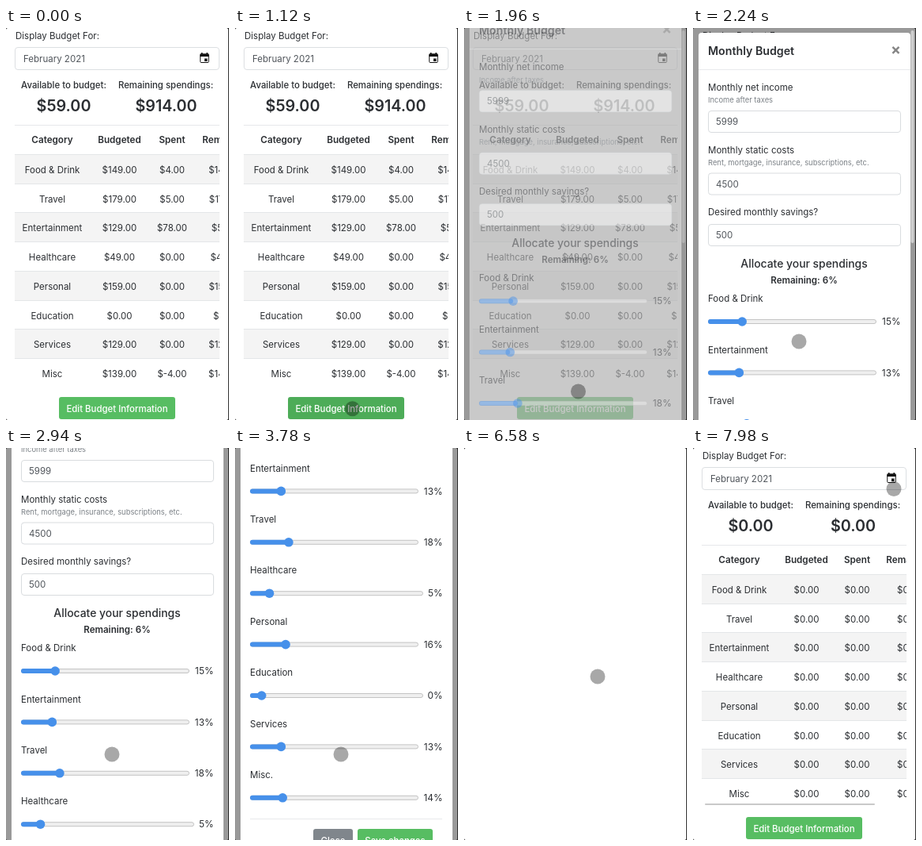
Animation of 282x494 px, one loop 8000 ms. Source, as an HTML page with a canvas:

```html
<!DOCTYPE html>
<html lang="en">
<head>
<meta charset="utf-8">
<title>Monthly budget</title>
<style>
html, body { margin: 0; width: 100%; height: 100%; overflow: hidden; background: #333; }
canvas { display: block; width: 282px; height: 494px; }
</style>
</head>
<body>
<canvas id="stage"></canvas>
<script>
const W = 282, H = 494, LOOP = 8000, STEP = 70;
const canvas = document.getElementById('stage');
const c = canvas.getContext('2d');
const dpr = window.devicePixelRatio || 1;
canvas.width = W * dpr;
canvas.height = H * dpr;

const INK = '#2b2e32', GREEN = '#57bd62', GREEN_HOVER = '#4dac58', BLUE = '#4690ea';
const BACKDROP = 0.4, CONTENT_H = 919;

// Budget rows: name, budgeted, spent
const rows = [
  ['Food & Drink', 149, 4], ['Travel', 179, 5], ['Entertainment', 129, 78],
  ['Healthcare', 49, 0], ['Personal', 159, 0], ['Education', 0, 0],
  ['Services', 129, 0], ['Misc', 139, -4]
];
const sliders = [
  ['Food & Drink', 15], ['Entertainment', 13], ['Travel', 18], ['Healthcare', 5],
  ['Personal', 16], ['Education', 0], ['Services', 13], ['Misc.', 14]
];

// Keyframes: time followed by values
const scrollKeys = [[2310, 0], [2520, 50], [2800, 86], [2940, 89], [3150, 230],
  [3430, 230], [3640, 350], [3710, 350], [3780, 380], [3920, 425]];
const cursorKeys = [[350, 150, 506], [490, 150, 482], [700, 150, 482], [1260, 148, 479],
  [1890, 148, 479], [2170, 134, 395], [2380, 134, 395], [2800, 134, 386], [4060, 134, 386],
  [4900, 168, 458], [6370, 168, 458], [6580, 169, 288], [6860, 200, 130],
  [7210, 228.5, 46], [7350, 228.5, 46], [7420, 254, 51.5]];

const clamp01 = v => Math.min(1, Math.max(0, v));
const ramp = (t, start, length) => clamp01((t - start) / length);
const money = n => '$' + n.toFixed(2);

function at(keys, t) {
  const i = keys.findIndex(k => k[0] > t);
  if (i < 0) return keys[keys.length - 1].slice(1);
  if (i === 0) return keys[0].slice(1);
  const a = keys[i - 1], b = keys[i], p = (t - a[0]) / (b[0] - a[0]);
  return a.slice(1).map((v, j) => v + (b[j + 1] - v) * p);
}

// y is the middle of the capital letters
function text(str, x, y, { size = 11.5, weight = 400, color = INK, align = 'left' } = {}) {
  c.font = `${weight} ${size}px Inter, "Open Sans", sans-serif`;
  c.textAlign = align;
  c.fillStyle = color;
  c.fillText(str, x, y + size * 0.36);
}

function box(x, y, w, h, r, fill, stroke) {
  c.beginPath();
  c.roundRect(x, y, w, h, r);
  if (fill) { c.fillStyle = fill; c.fill(); }
  if (stroke) { c.strokeStyle = stroke; c.lineWidth = 1; c.stroke(); }
}

function rect(x, y, w, h, fill) {
  c.fillStyle = fill;
  c.fillRect(x, y, w, h);
}

function disc(x, y, r, fill) {
  c.beginPath();
  c.arc(x, y, r, 0, 7);
  c.fillStyle = fill;
  c.fill();
}

function button(label, x, y, w, fill) {
  box(x, y, w, 28, 3, fill);
  text(label, x + w / 2, y + 14.5, { size: 11.4, weight: 500, color: '#fff', align: 'center' });
}

function calendarIcon(x, y) {
  box(x + 0.75, y + 2, 10.5, 10.5, 1, null, '#111');
  rect(x + 0.5, y + 1.5, 11, 3.5, '#111');
  rect(x + 2, y, 1.5, 2, '#111');
  rect(x + 8.5, y, 1.5, 2, '#111');
  rect(x + 6, y + 7.5, 3.5, 3.5, '#111');
}

function page(empty, hover) {
  const mid = { align: 'center' }, head = { align: 'center', weight: 600, size: 11.7 };
  const big = { align: 'center', weight: 600, size: 19.8 };
  const label = { align: 'center', weight: 500, size: 11.4 };
  const spentX = empty ? 207.5 : 210, remX = empty ? 274 : 278;

  text('Display Budget For:', 12, 10);
  box(11.5, 24.5, 258, 28, 3.5, '#fff', '#dcdfe2');
  text('February 2021', 22, 39, { color: '#50555b' });
  calendarIcon(245, 31);
  text('Available to budget:', 73, 72, label);
  text('Remaining spendings:', 202, 72, label);
  text(money(empty ? 0 : 59), 73, 98, big);
  text(money(empty ? 0 : 914), 202.5, 98, big);

  c.save();
  c.beginPath();
  c.rect(11, 120, 259, 335);
  c.clip();
  rect(11, 122, 259, 1, '#e6e8ea');
  text('Category', 58.5, 141, head);
  text('Budgeted', 143.5, 141, head);
  text('Spent', spentX, 141, head);
  text('Remaining', remX, 141, head);
  rows.forEach(([name, budget, spent], i) => {
    const top = 159 + Math.round(36.7 * i), y = top + 20;
    if (i % 2 === 0) rect(11, top, 259, 37, '#f4f4f4');
    rect(11, top, 259, 1, '#e4e6e8');
    text(name, 58.5, y, mid);
    text(money(empty ? 0 : budget), 143.5, y, mid);
    text(money(empty ? 0 : spent), spentX, y, mid);
    text(money(empty ? 0 : budget - spent), remX, y, mid);
  });
  if (empty) box(15, 448, 215, 2, 1, '#c9c9c9');
  c.restore();
  button('Edit Budget Information', 67, 465, 147, hover ? GREEN_HOVER : GREEN);
}

function field(label, hint, value, y) {
  text(label, 19, y);
  if (hint) text(hint, 19, y + 16, { size: 9.4, color: '#7b8086' });
  const top = y + (hint ? 29 : 15);
  box(19.5, top + 0.5, 243, 27, 3.5, '#fff', '#d9dcdf');
  text(value, 29, top + 14, { color: '#50555b' });
}

function slider(label, percent, y) {
  const w = percent < 10 ? 219 : 213;
  const x = 25 + (w - 12) * (percent + 4.4) / 105;
  text(label, 19, y);
  box(19.5, y + 26.5, w - 1, 5, 2.5, '#efefef', '#c4c4c4');
  box(19, y + 26, x - 19, 6, 3, BLUE);
  disc(x, y + 29, 5.8, BLUE);
  text(percent + '%', 262.5, y + 29, { size: 11.8, align: 'right' });
}

function modal(scroll, slide, hover) {
  c.save();
  c.translate(0, slide - scroll);
  box(7, 6, 268, 906, 4, '#fff');
  text('Monthly Budget', 19, 29, { size: 14.2, weight: 600 });
  text('×', 256.5, 27.5, { size: 19, weight: 700, color: '#858585', align: 'center' });
  rect(7, 52, 268, 1, '#e8eaec');
  field('Monthly net income', 'Income after taxes', '5999', 75);
  field('Monthly static costs', 'Rent, mortgage, insurance, subscriptions, etc.', '4500', 153.5);
  field('Desired monthly savings?', '', '500', 232);
  text('Allocate your spendings', 140.5, 296.5, { size: 13.9, weight: 500, align: 'center' });
  text('Remaining: 6%', 140.5, 318, { size: 11.6, weight: 600, align: 'center' });
  sliders.forEach(([label, percent], i) => slider(label, percent, 341 + 64.4 * i));
  rect(19, 847, 243, 1, '#e8eaec');
  button('Close', 99, 860, 50, '#80868c');
  button('Save changes', 155, 860, 95, hover ? GREEN_HOVER : GREEN);
  c.restore();
}

function cursor(t) {
  if (t < 420) return;
  const [x, y] = at(cursorKeys, t);
  const pressed = (t >= 1540 && t < 1890) || (t >= 5810 && t < 6020);
  if (!pressed) return disc(x, y, 9.5, 'rgba(0,0,0,.34)');
  disc(x, y, 9.5, 'rgba(40,50,45,.5)');
  c.strokeStyle = 'rgba(225,225,225,.7)';
  c.lineWidth = 1.6;
  c.stroke();
}

function draw(t) {
  c.setTransform(dpr, 0, 0, dpr, 0, 0);
  rect(0, 0, W, H, '#333');
  c.save();
  c.beginPath();
  c.roundRect(0, 0, W - 1, H, 2.5);
  c.clip();
  rect(0, 0, W, H, '#fff');

  if (t < 6160) {
    page(false, t >= 490 && t < 1960);
    rect(0, 0, W, H, `rgba(0,0,0,${BACKDROP * ramp(t, 1680, 210)})`);
    const [scroll] = at(scrollKeys, t);
    c.globalAlpha = ramp(t, 1890, 150);
    if (c.globalAlpha > 0) {
      modal(scroll, -44 * (1 - ramp(t, 1890, 300)) ** 2, t >= 4830);
      if (t < 2800) box(275.5, 3 + scroll * H / CONTENT_H, 4, 268, 2, '#cfcfcf');
    }
    c.globalAlpha = 1;
  } else if (t >= 7700) {
    page(true, false);
  }
  cursor(t);
  c.restore();
}

const start = performance.now();
function tick() {
  const t = (performance.now() - start) % LOOP;
  draw(Math.floor(t / STEP) * STEP);
  requestAnimationFrame(tick);
}
tick();
</script>
</body>
</html>
```
